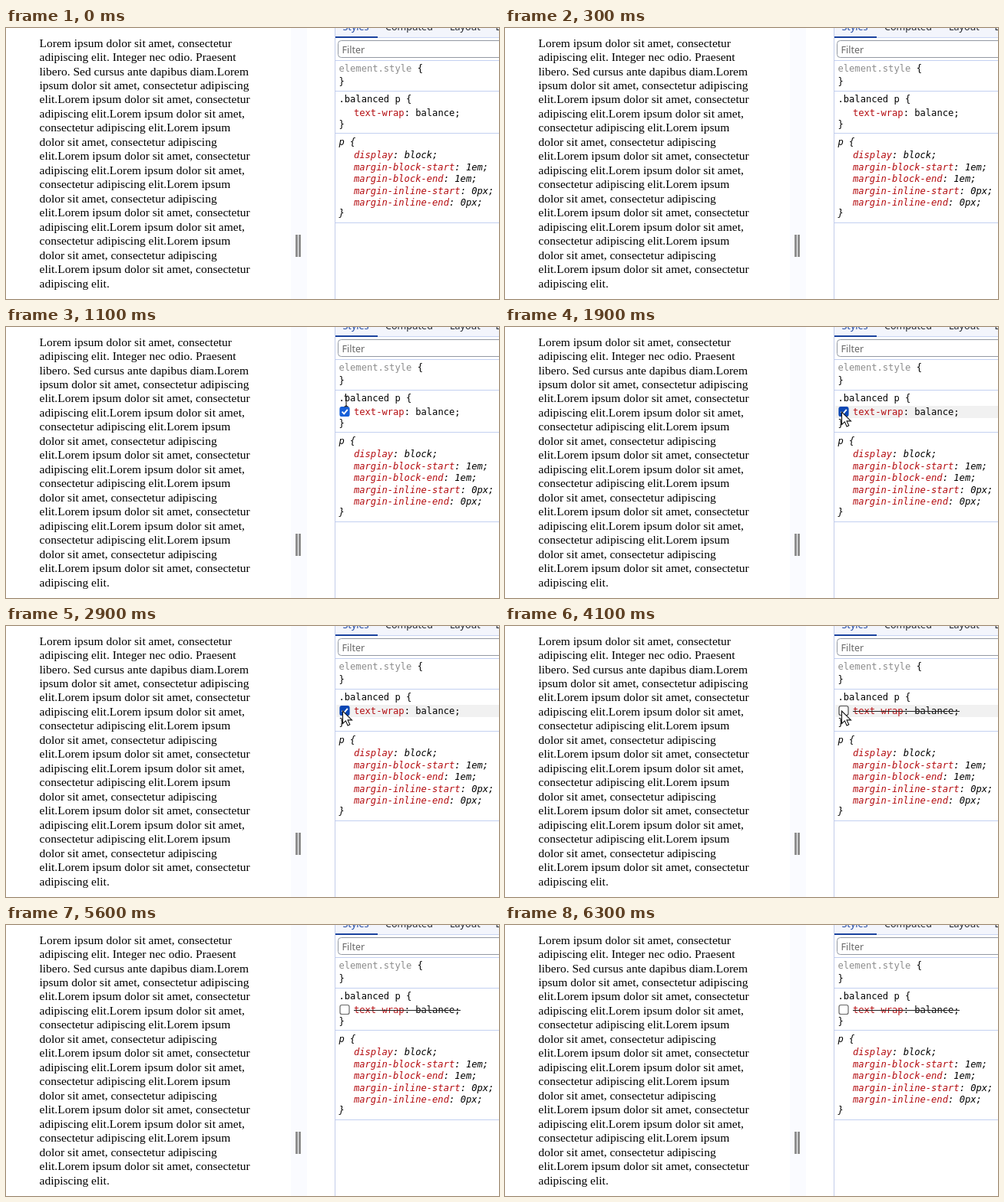
Write an HTML page that moves like this. It is 642 by 354 pixels and loops after 6.4 s.

```html
<!DOCTYPE html>
<html lang="en">
<head>
<meta charset="utf-8">
<style>
html, body { margin: 0; width: 100%; height: 100%; overflow: hidden; background: #fff; }
svg { display: block; }
text { white-space: pre; }
.page { font: 15.5px "Liberation Serif", serif; fill: #000; }
.ui { font: 12.5px "Noto Sans", sans-serif; fill: #22262e; }
.code { font: 12.12px "DejaVu Sans Mono", monospace; fill: #000; }
.agent { font-style: italic; }
.prop { fill: #b40c10; }
.muted { fill: #8c8c8c; }
</style>
</head>
<body>
<svg id="stage" width="642" height="354" viewBox="0 0 642 354">
  <rect width="642" height="354" fill="#fff"/>
  <g id="page" class="page"></g>
  <rect x="371" width="21" height="354" fill="#fafbff"/>
  <g fill="#8e8e8e">
    <rect x="377" y="270" width="3" height="29"/>
    <rect x="381" y="270" width="3" height="29"/>
  </g>
  <rect x="429" width="213" height="12" fill="#f3f5fc"/>
  <path d="M428.5 0V354" stroke="#c3cdea"/>
  <g class="ui">
    <text x="438.5" y="3" fill="#1d45a0">Styles</text>
    <text x="494" y="3">Computed</text>
    <text x="578" y="3">Layout</text>
    <text x="637.5" y="3">Event</text>
    <path d="M429 12.5H642" stroke="#c9d5f3"/>
    <rect x="429" y="11" width="55" height="2" fill="#1a429e"/>
    <rect x="432.5" y="16.5" width="240" height="22" rx="4" fill="#fff" stroke="#9298a2"/>
    <text x="437.5" y="33" fill="#686868">Filter</text>
  </g>
  <path d="M429 42.5H642M429 82.5H642M429 137.5H642M429 254.5H642" stroke="#c3d0f1"/>
  <rect id="rowHover" x="430" y="103" width="212" height="16" fill="#f1f1f1"/>
  <g id="code" class="code"></g>
  <path id="strike" d="M453 111.5H592" stroke="#222"/>
  <g id="checkbox">
    <rect id="box" x="435" y="104.5" width="12" height="12" rx="2.3" stroke-width="1.2"/>
    <path id="tick" d="M437.6 110.6l2.6 2.7 4.6-5.4" fill="none" stroke="#fff" stroke-width="1.9"/>
  </g>
  <g id="arrow">
    <path d="M0 0V16.5L3.9 12.9L6.6 19L9.3 17.8L6.6 11.9H12Z" fill="#fff" stroke="#111" stroke-width="1.1"/>
  </g>
  <g id="beam" fill="none">
    <path d="M-2.5 -7Q0 -7 0 -5V5Q0 7 -2.5 7M2.5 -7Q0 -7 0 -5M0 5Q0 7 2.5 7" stroke="#222" stroke-width="1.1"/>
  </g>
</svg>
<script>
const LOOP = 6400;
const UNCHECK_AT = 3600;
const $ = id => document.getElementById(id);

function addText(parent, x, y, content, className = "") {
  const node = document.createElementNS("http://www.w3.org/2000/svg", "text");
  node.setAttribute("x", x);
  node.setAttribute("y", y);
  node.setAttribute("class", className);
  node.textContent = content;
  parent.append(node);
}

const sentence = "Lorem ipsum dolor sit amet, consectetur";
const block = [
  "ipsum dolor sit amet, consectetur adipiscing",
  "elit." + sentence,
  "adipiscing elit.Lorem ipsum dolor sit amet,",
  "consectetur adipiscing elit.Lorem ipsum",
  "dolor sit amet, consectetur adipiscing"
];
const repeating = block.slice(1);
const lines = [
  sentence,
  "adipiscing elit. Integer nec odio. Praesent",
  "libero. Sed cursus ante dapibus diam.Lorem",
  ...block, ...repeating, ...repeating,
  "elit." + sentence,
  "adipiscing elit."
];
lines.forEach((line, i) => addText($("page"), 43.5, 24.6 + i * 18.47, line));

const code = $("code");
const LEFT = 433.5;
const CHAR = 7.297;

function addDeclaration(name, value, y, className = "") {
  addText(code, 453, y, name, "prop " + className);
  addText(code, 453 + name.length * CHAR, y, `: ${value};`, className);
}

addText(code, LEFT, 57, "element.style", "muted");
addText(code, LEFT + 14 * CHAR, 57, "{");
addText(code, LEFT, 73.7, "}");
addText(code, LEFT, 97.3, ".balanced p {");
addDeclaration("text-wrap", "balance", 115.3);
addText(code, LEFT, 129.7, "}");
addText(code, LEFT, 153, "p {", "agent");
[
  ["display", "block"],
  ["margin-block-start", "1em"],
  ["margin-block-end", "1em"],
  ["margin-inline-start", "0px"],
  ["margin-inline-end", "0px"]
].forEach(([name, value], i) => addDeclaration(name, value, 170 + i * 15.5, "agent"));
addText(code, LEFT, 246.3, "}", "agent");

// Pointer stops: time, x, y
const path = [
  [600, 400, 375],
  [1000, 443, 97],
  [1150, 443, 97],
  [1400, 438.5, 111],
  [4300, 438.5, 111],
  [4900, 400, 375]
];

function pointerAt(t) {
  const next = path.findIndex(stop => stop[0] > t);
  if (next < 1) return null;
  const [t0, x0, y0] = path[next - 1];
  const [t1, x1, y1] = path[next];
  const k = (t - t0) / (t1 - t0);
  const ease = k * k * (3 - 2 * k);
  return { x: x0 + (x1 - x0) * ease, y: y0 + (y1 - y0) * ease };
}

function show(id, visible) {
  $(id).setAttribute("visibility", visible ? "visible" : "hidden");
}

function render(t) {
  const pointer = pointerAt(t);
  const checked = t < UNCHECK_AT;
  const within = (top, bottom) => Boolean(pointer && pointer.y > top && pointer.y < bottom);
  const onRow = within(103, 119);
  const onBeam = within(82, 103) && pointer.x > 433;

  show("rowHover", onRow);
  show("strike", !checked);
  show("checkbox", !checked || within(82, 137));
  show("tick", checked && within(82, 137));
  const blue = onRow ? "#0b47b5" : "#1860d8";
  $("box").setAttribute("fill", checked ? blue : "#fff");
  $("box").setAttribute("stroke", checked ? blue : onRow ? "#4c4c4c" : "#686868");

  show("beam", onBeam);
  show("arrow", pointer && !onBeam);
  if (pointer) {
    const move = `translate(${pointer.x} ${pointer.y})`;
    $("arrow").setAttribute("transform", move);
    $("beam").setAttribute("transform", move);
  }
}

const start = performance.now();
function tick() {
  render((performance.now() - start) % LOOP);
  requestAnimationFrame(tick);
}
tick();
</script>
</body>
</html>
```
